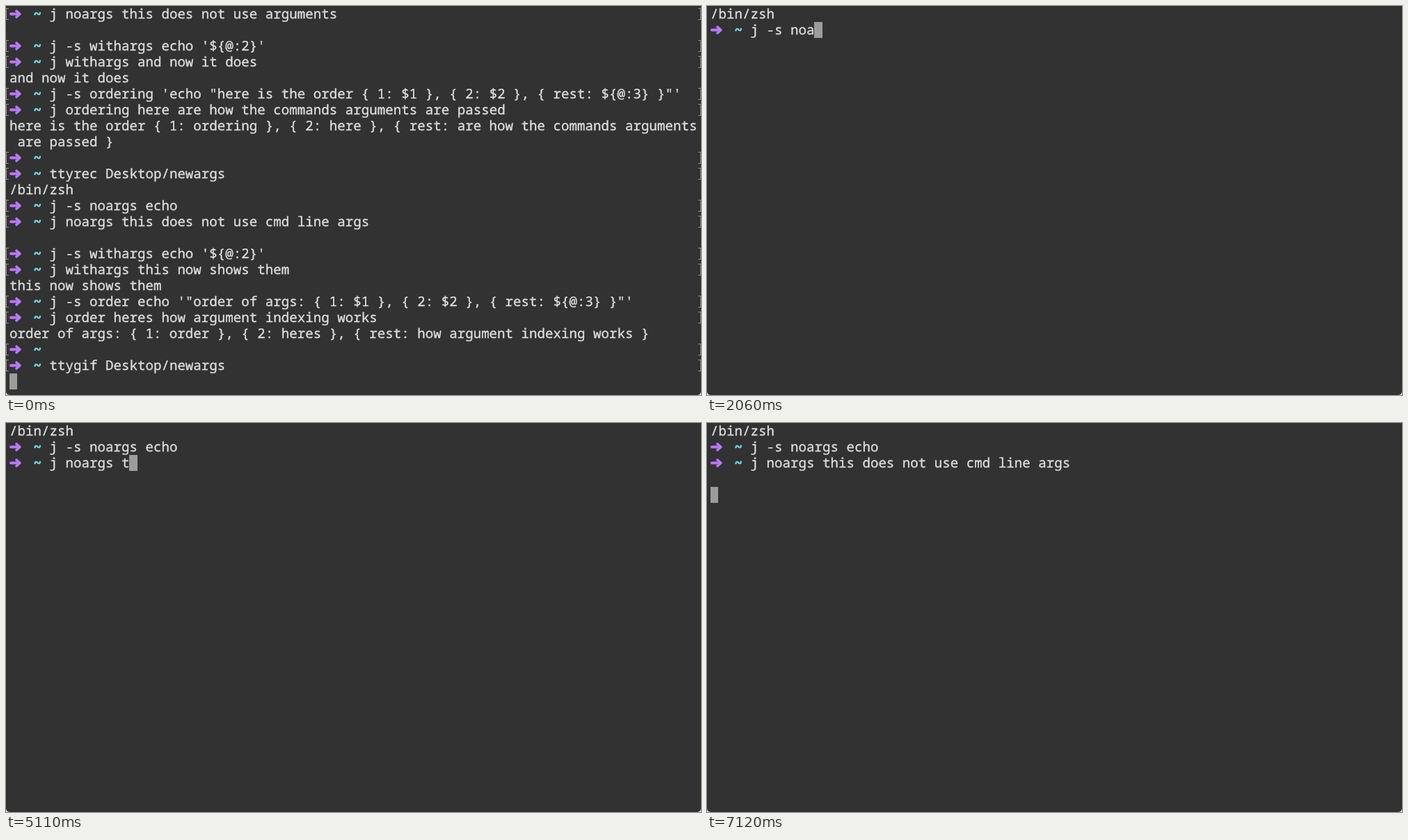
Recreate the animation shown at these times as an HTML page. Size 999 by 560 pixels, loop 8 s.

```html
<!DOCTYPE html>
<html lang="en">
<head>
<meta charset="utf-8">
<title>Terminal</title>
<style>
  html, body { margin: 0; width: 100%; height: 100%; overflow: hidden; background: #f0f0f0; }
  #term {
    position: relative; width: 999px; height: 560px; overflow: hidden;
    background: #323232; border-radius: 0 0 5px 5px;
    font: 500 19.17px/23px "Noto Sans Mono", "DejaVu Sans Mono", monospace;
    font-variant-ligatures: none; text-rendering: geometricPrecision;
    color: #dedede; -webkit-text-stroke: 0.35px;
  }
  .row { position: absolute; left: 0; width: 999px; height: 23px; }
  .text { position: absolute; left: 5px; top: 0; white-space: pre; }
  .tilde { color: #6fd9e2; font-weight: bold; -webkit-text-stroke: 0.9px; }
  .arrow { position: absolute; left: 5px; top: 0; fill: none; stroke: #b978ff; stroke-linecap: round; stroke-linejoin: round; }
  .mark { position: absolute; top: 3px; width: 3px; height: 15px; border: 1.5px solid #909090; }
  .mark.open { left: 0; border-right: 0; }
  .mark.close { right: 0; border-left: 0; }
  #cursor { position: absolute; height: 23px; background: #9c9c9c; }
</style>
</head>
<body>
<div id="term"><div id="rows"></div><div id="cursor"></div></div>
<script>
const LOOP = 8000, CELL_W = 11.5, CELL_H = 23, LEFT = 5;
const PROMPT = '> ', PROMPT_COLS = 5;
const SHELL = '/bin/zsh';
const SAVE = 'j -s noargs echo';
const RUN = 'j noargs this does not use cmd line args';

// Lines that begin with PROMPT get the arrow and tilde.
const HISTORY = [
  '> j noargs this does not use arguments',
  '',
  "> j -s withargs echo '${@:2}'",
  '> j withargs and now it does',
  'and now it does',
  `> j -s ordering 'echo "here is the order { 1: $1 }, { 2: $2 }, { rest: \${@:3} }"'`,
  '> j ordering here are how the commands arguments are passed',
  'here is the order { 1: ordering }, { 2: here }, { rest: are how the commands arguments',
  ' are passed }',
  '> ',
  '> ttyrec Desktop/newargs',
  SHELL,
  PROMPT + SAVE,
  PROMPT + RUN,
  '',
  "> j -s withargs echo '${@:2}'",
  '> j withargs this now shows them',
  'this now shows them',
  `> j -s order echo '"order of args: { 1: $1 }, { 2: $2 }, { rest: \${@:3} }"'`,
  '> j order heres how argument indexing works',
  'order of args: { 1: order }, { 2: heres }, { rest: how argument indexing works }',
  '> ',
  '> ttygif Desktop/newargs',
  ''
];

// Bursts of typing: first key time, last key time, characters shown at each.
const SAVE_KEYS = [
  [1300, 1440, 1, 3], [1660, 1660, 4, 4], [1880, 2060, 5, 8],
  [2130, 2190, 9, 10], [2380, 2520, 11, 14], [3570, 3570, 15, 15]
];
const RUN_KEYS = [
  [4270, 4630, 1, 7], [5020, 5110, 8, 10], [5150, 5150, 11, 11],
  [5300, 5780, 12, 21], [5850, 5990, 22, 25], [6290, 7080, 26, 39]
];

const steps = [];
const addStep = (time, lines, marks = false) => steps.push({ time, lines, marks });

function addTyping(before, command, bursts) {
  for (const [start, end, first, last] of bursts) {
    const gap = (end - start) / Math.max(1, last - first);
    for (let n = first; n <= last; n++) {
      const time = Math.round((start + (n - first) * gap) / 10) * 10;
      addStep(time, [...before, PROMPT + command.slice(0, n)]);
    }
  }
}

const saved = [SHELL, PROMPT + SAVE];
const ran = [...saved, PROMPT + RUN];
addStep(0, HISTORY, true);
addStep(50, ['']);
addStep(70, [SHELL, '']);
addStep(1170, [SHELL, PROMPT]);
addTyping([SHELL], SAVE, SAVE_KEYS);
addStep(3590, [...saved, '']);
addStep(4210, [...saved, PROMPT]);
addTyping(saved, RUN, RUN_KEYS);
addStep(7100, [...ran, '']);
addStep(7120, [...ran, '', '']);

const rows = document.getElementById('rows');
const cursor = document.getElementById('cursor');
const escapeHtml = s => s.replace(/&/g, '&amp;').replace(/</g, '&lt;');

const ARROW = `<svg class="arrow" width="20" height="23">
  <path d="M2 11.5H13" stroke-width="4"/>
  <path d="M10 7.2L15 11.5L10 15.8" stroke-width="3.6"/></svg>`;
const MARKS = '<i class="mark open"></i><i class="mark close"></i>';

function rowHtml(line, index, marks) {
  const prompted = line.startsWith(PROMPT);
  const text = prompted
    ? '   <span class="tilde">~</span> ' + escapeHtml(line.slice(PROMPT.length))
    : escapeHtml(line);
  return `<div class="row" style="top:${index * CELL_H}px">` +
    (prompted ? ARROW + (marks ? MARKS : '') : '') +
    `<span class="text">${text}</span></div>`;
}

const cellX = col => Math.floor(LEFT + col * CELL_W);

function show({ lines, marks }) {
  rows.innerHTML = lines.map((line, i) => rowHtml(line, i, marks)).join('');
  const last = lines[lines.length - 1];
  const col = last.startsWith(PROMPT) ? PROMPT_COLS + last.length - PROMPT.length : last.length;
  cursor.style.left = cellX(col) + 'px';
  cursor.style.width = cellX(col + 1) - cellX(col) + 'px';
  cursor.style.top = (lines.length - 1) * CELL_H + 'px';
}

const began = performance.now();
let shown = null;
function tick() {
  const time = (performance.now() - began) % LOOP;
  const step = steps.findLast(s => s.time <= time) || steps[0];
  if (step !== shown) show(shown = step);
  requestAnimationFrame(tick);
}
tick();
</script>
</body>
</html>
```
